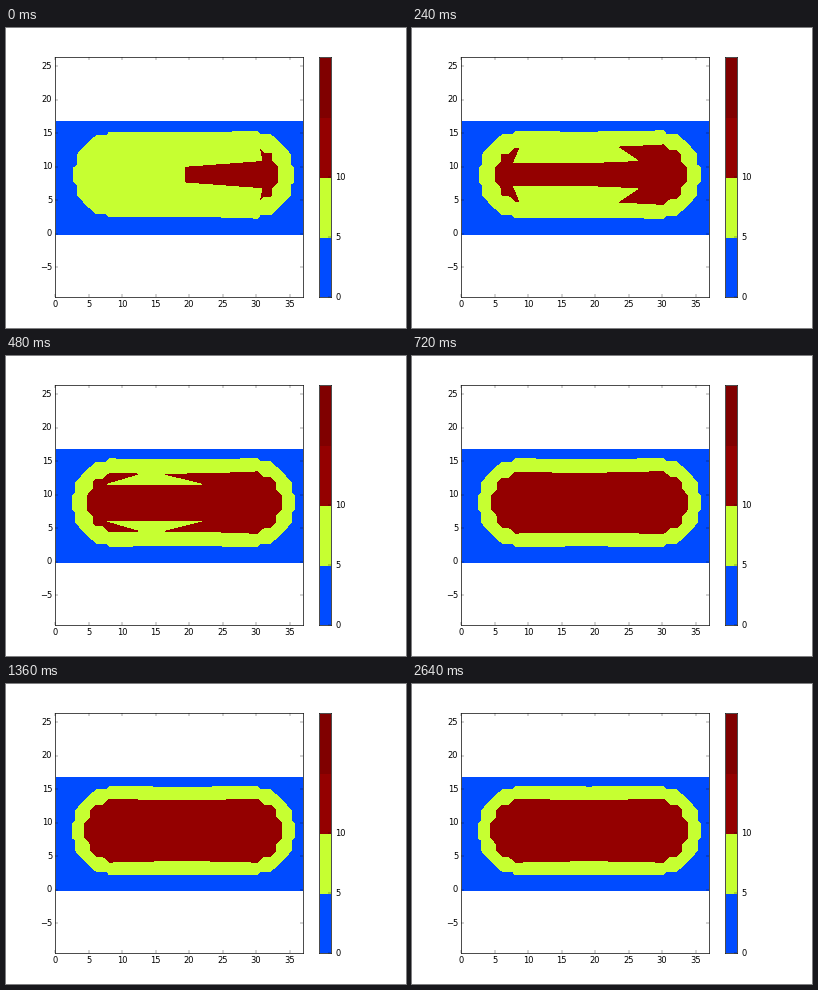
Recreate the animation shown at these times as a matplotlib script. Size 400 px wide and 300 px high, loop 8960 ms.

```python
import matplotlib.pyplot as plt
import numpy as np
from matplotlib.animation import FuncAnimation
from matplotlib.patches import Polygon, Rectangle
from matplotlib.transforms import Affine2D

plt.style.use("classic")
plt.rcParams.update({"savefig.dpi": "figure", "font.family": "DejaVu Sans"})

W, H = 400, 300
FRAMES, STEP_MS, LAST_STEP = 112, 80, 33
BLUE, LIME, RED, DARK = "#004bff", "#c6ff31", "#940000", "#800000"

LEFT, RIGHT, AXIS = 9, 29, 9   # cap centres and the mirror line
MIDDLE = (LEFT + RIGHT) / 2
LAG = 4                        # steps by which the left cap trails
MERGED = 8                     # step at which the gap has closed

# Corners of one eighth of a cap: (inset from the radius, height).
OUTER_CORNERS = [(0, 1), (0.5, 1.45), (0.5, 2.95), (1.5, 4.1)]
INNER_CORNERS = [(0, 1), (0.9, 2), (0.9, 3)]


def mirrored(half):
    """Close an upper outline with its reflection."""
    half = np.array(half)
    return np.vstack([half, half[::-1] * (1, -1)]) + (0, AXIS)


def quarter(radius, corners):
    eighth = np.array([(radius - inset, y) for inset, y in corners])
    return np.vstack([eighth, eighth[::-1, ::-1]])


def capsule(r_left, r_right, corners, dip):
    """Stepped capsule whose long sides sag in the middle."""
    left = quarter(r_left, corners) * (-1, 1) + (LEFT, 0)
    right = quarter(r_right, corners)[::-1] + (RIGHT, 0)
    u = np.linspace(-1, 1, 45)[1:-1]
    x = MIDDLE + u * (right[0, 0] - MIDDLE)
    y = r_left + (r_right - r_left) * (u + 1) / 2 - dip * (1 - u**2)
    return np.vstack([left, np.column_stack([x, y]), right])


def radii(step, limit, gain):
    return [limit - gain * np.exp(-(step - lag) / 4) for lag in (LAG, 0)]


def outer(step):
    dip = 0.0753 + 0.1 * np.exp(-step / 9)
    return mirrored(capsule(*radii(step, 6.59, 0.1), OUTER_CORNERS, dip))


def inner(step):
    half = capsule(*radii(step, 4.715, 0.6), INNER_CORNERS, 0.2)
    tail = 4 + 15.3 * np.exp(-1.4 * step)
    half[:, 0] = np.maximum(half[:, 0], tail)
    return mirrored(half)


def gap(step):
    """Open space above the core, closing in between two wing tips."""
    core = 1.15 + 0.2 * step + 0.1 * max(step - 4, 0) ** 2
    left_tip = 9.9 + 1.2 * (step - 4)
    right_tip = max(30.3 - 2.35 * step, left_tip)
    return np.array([
        (left_tip, 4.6), (left_tip, 4.1), (7.7, core), (18, core),
        (30.7 - 1.5 * step, max(core, 2.1)),
        (right_tip, 4.1), (right_tip, 4.6)])


def add_axes(x, y, w, h):
    return fig.add_axes([x / W, y / H, w / W, h / H])


def paint(ax, patch, color):
    # Fills sit one pixel right of and below the lines.
    patch.set(fc=color, ec="none", lw=0, antialiased=False,
              transform=ax.transData + Affine2D().translate(1, -1))
    return ax.add_patch(patch)


fig = plt.figure(figsize=(W / 50, H / 50), dpi=50, facecolor="white")

ax = add_axes(49, 31, 248, 240)
half_span = 37 * 120 / 248
ax.set_xlim(0, 37)
ax.set_ylim(8.5 - half_span, 8.5 + half_span)
ax.set_xticks(range(0, 36, 5))
ax.set_yticks(range(-5, 26, 5))
paint(ax, Rectangle((0, 0), 37, 17), BLUE)
lime = paint(ax, Polygon(outer(0)), LIME)
red = paint(ax, Polygon(inner(0)), RED)
gaps = {side: paint(ax, Polygon(gap(0)), LIME) for side in (1, -1)}

bar = add_axes(312.5, 31, 12, 240)
bar.set_xlim(0, 1)
bar.set_ylim(0, 20)
for i, color in enumerate((BLUE, LIME, RED, DARK)):
    paint(bar, Rectangle((0, 5 * i), 1, 5), color)
bar.set_xticks([])
bar.set_yticks([0, 5, 10])
bar.yaxis.tick_right()
bar.tick_params(axis="y", pad=6.5)


def update(frame):
    step = min(frame, LAST_STEP)
    lime.set_xy(outer(step))
    red.set_xy(inner(step))
    for side, patch in gaps.items():
        patch.set_xy(gap(min(step, MERGED)) * (1, side) + (0, AXIS))
        patch.set_visible(step < MERGED)
    return [lime, red, *gaps.values()]


anim = FuncAnimation(fig, update, frames=FRAMES, interval=STEP_MS,
                     repeat=True, repeat_delay=0, blit=False)
plt.show()
```
